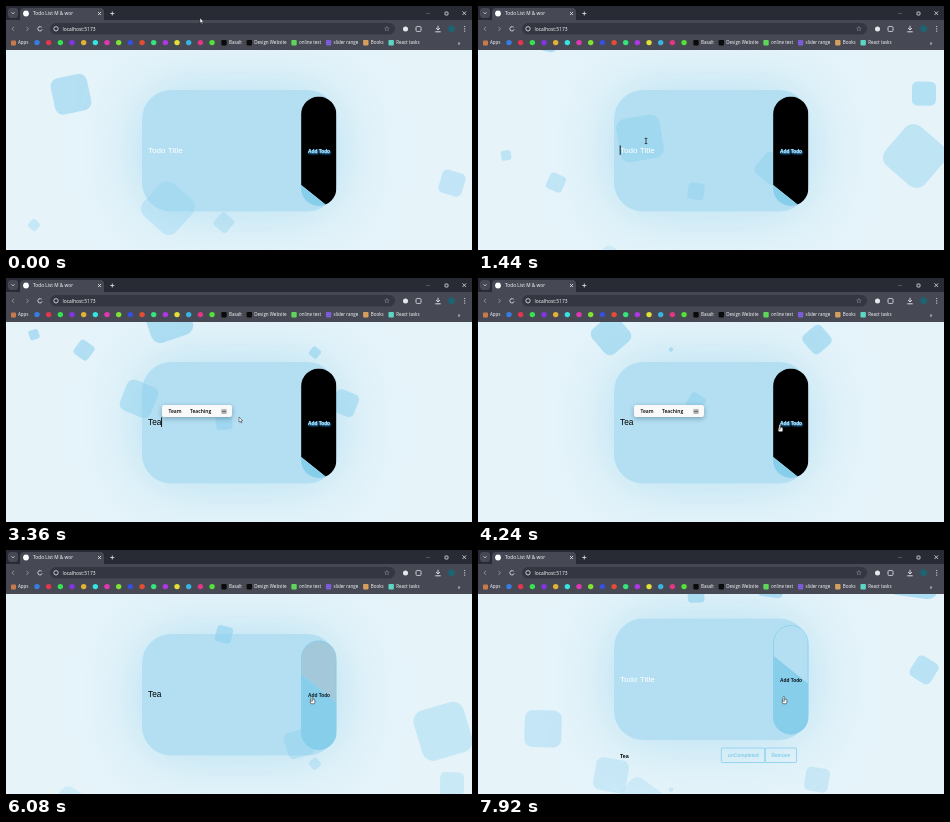
Write an HTML page with a canvas that moves like this. It is 466 by 244 pixels and loops after 8000 ms.

```html
<!DOCTYPE html>
<html lang="en">
<head>
<meta charset="utf-8">
<title>Todo list</title>
<style>
html, body { margin: 0; width: 100%; height: 100%; overflow: hidden; background: #e6f4fa; }
canvas { display: block; width: 466px; height: 244px; }
</style>
</head>
<body>
<canvas id="stage" width="466" height="244"></canvas>
<script>
const W = 466, H = 244, LOOP = 8000, STEP = 80;
const c = document.getElementById('stage').getContext('2d');
const SKY = '#87ceeb', INK = '#0a1218', PALE = '#e6e8ec', BAR = '#464954';
const SANS = '"Liberation Sans", Arial, sans-serif';
const UI = '"Open Sans", "Noto Sans", sans-serif';

// Pointer stops: arrival time, x, y
const STOPS = [
  [0, 194, 12], [1.1, 168, 135], [2.5, 167, 138], [3.3, 233, 139],
  [4.25, 302, 149], [5.2, 273, 148], [5.75, 306, 149]
];
const GLIDE = 0.55, FIRST_KEY = 1.8, KEY_GAP = 0.22, FOCUS = 1.36, ADDED = 6.2;

const clamp = v => Math.max(0, Math.min(1, v));
const ease = v => { v = clamp(v); return v * v * (3 - 2 * v); };

function box(x, y, w, h, r, fill, stroke, lw = 0.8) {
  c.beginPath();
  c.roundRect(x, y, w, h, r);
  if (fill) { c.fillStyle = fill; c.fill(); }
  if (stroke) { c.strokeStyle = stroke; c.lineWidth = lw; c.stroke(); }
}

function dot(x, y, r, fill) {
  box(x - r, y - r, r * 2, r * 2, r, fill);
}

function line(color, lw, ...p) {
  c.beginPath();
  for (let i = 0; i < p.length; i += 2) c.lineTo(p[i], p[i + 1]);
  c.strokeStyle = color;
  c.lineWidth = lw;
  c.stroke();
}

function text(s, x, y, size, color, font = SANS, weight = '', align = 'left') {
  c.font = `${weight} ${size}px ${font}`;
  c.textAlign = align;
  c.fillStyle = color;
  c.fillText(s, x, y);
  return c.measureText(s).width;
}

// A square rises and turns once every `secs`; `lead` is the time already spent.
function square(t, secs, lead, x, size) {
  const p = ((t + lead) / secs) % 1;
  c.save();
  c.translate(x, 296 - size / 2 - 435 * p);
  c.rotate(800 * p * Math.PI / 180);
  box(-size / 2, -size / 2, size, size, size * 0.22, `rgba(135,206,238,${0.22 + 0.66 * p})`);
  c.restore();
}

function squares(t) {
  const rise = (secs, lead, ...list) => list.forEach(([x, size]) => square(t, secs, lead, x, size));
  rise(4, 2.63, [309, 10]);
  rise(5, 4.94, [437, 52], [293, 27]);
  rise(6, 4.83, [133, 33], [339, 24], [193, 4]);
  rise(7, 1.72, [446, 24]);
  rise(8, 0.6, [78, 17]);
  rise(9, 1.49, [162, 44], [28, 10]);
  rise(10, 4.35, [65, 37]);
  rise(20, 3.27, [218, 16.5]);
}

function card(top) {
  c.save();
  c.beginPath();
  c.rect(0, 0, W, H);
  c.roundRect(136, top, 194.5, 121.5, 29);
  c.clip('evenodd');
  c.shadowColor = 'rgba(135,206,235,.55)';
  c.shadowBlur = 60;
  c.shadowOffsetX = 1000;
  box(-864, top, 194.5, 121.5, 29, '#000');
  c.restore();
  box(136, top, 194.5, 121.5, 29, 'rgba(135,206,235,.52)');
}

function addButton(top, hover) {
  const x = 295.1, y = top - 0.4, w = 35.3, h = 109.3, slope = 0.8;
  const cut = top + 88 - 58 * hover;
  const part = (edge, fill) => {
    c.beginPath();
    c.moveTo(x, cut);
    c.lineTo(x + w, cut + w * slope);
    c.lineTo(x + w, edge);
    c.lineTo(x, edge);
    c.fillStyle = fill;
    c.fill();
  };
  c.save();
  c.beginPath();
  c.roundRect(x, y, w, h, w / 2);
  c.clip();
  part(y, `rgba(0,0,0,${1 - hover * hover})`);
  part(y + h + w, SKY);
  c.restore();
  c.globalAlpha = hover;
  box(x + 0.4, top, w - 0.8, h - 0.8, w / 2, null, SKY);
  c.globalAlpha = 1;

  const label = color => text('Add Todo', 313, top + 56.3, 4.8, color, SANS, 'bold', 'center');
  label(INK);
  c.save();
  c.globalAlpha = 1 - hover;
  c.shadowColor = '#3f9fe0';
  c.shadowBlur = 2;
  c.shadowOffsetX = c.shadowOffsetY = 0.5;
  label('#a9dcf7');
  label('#a9dcf7');
  c.restore();
}

function field(t, top) {
  const base = top + 63.4;
  const typed = Math.floor((t - FIRST_KEY) / KEY_GAP) + 1;
  const n = t < ADDED ? Math.max(0, Math.min(3, typed)) : 0;
  const width = n ? text('Tea'.slice(0, n), 142, base, 8.3, '#000') : 0;
  if (!n) text('Todo Title', 142, base, 8.1, '#fff');
  if (t > FOCUS && t < 6) {
    const since = t - (n ? FIRST_KEY + (n - 1) * KEY_GAP : FOCUS);
    const x = 142.2 + width;
    if (since % 1.06 < 0.53) line('#000', 0.9, x, base - 8, x, base + 1.5);
  }
}

function hints() {
  c.save();
  c.shadowColor = 'rgba(0,40,70,.35)';
  c.shadowBlur = 5;
  c.shadowOffsetY = 1.5;
  box(156, 127, 70, 12, 2, '#f9f9f9');
  c.restore();
  text('Team', 162.5, 135, 5, '#000', UI, 600);
  text('Teaching', 184, 135, 5, '#000', UI, 600);
  for (let y = 132; y < 136; y += 1.5) line('#333', 0.7, 215.5, y, 220.5, y);
}

function task() {
  text('Tea', 142, 207.7, 5.3, '#000', SANS, 'bold');
  box(243.3, 198, 43.7, 14.5, 1, null, SKY);
  box(287, 198, 31.5, 14.5, 1, null, SKY);
  text('unCompleted', 265.3, 207, 4.85, SKY, SANS, 'bold', 'center');
  text('Remove', 302.8, 207, 4.85, SKY, SANS, 'bold', 'center');
}

function cross(x, y, r) {
  line(PALE, 0.8, x - r, y - r, x + r, y + r);
  line(PALE, 0.8, x + r, y - r, x - r, y + r);
}

function tabs() {
  c.fillStyle = '#282b34';
  c.fillRect(0, 0, W, 15);
  box(2, 2, 10, 10, 3, BAR);
  line(PALE, 0.8, 5.5, 6.3, 7, 7.8, 8.5, 6.3);
  box(14, 2, 84, 16, 4, BAR);
  c.fillStyle = BAR;
  c.fillRect(0, 14, W, 30);
  dot(20, 7.5, 2.9, '#fff');
  text('Todo List M & wor', 27, 9.2, 4.8, '#fff', UI);
  cross(93.5, 7.5, 1.5);
  line(PALE, 0.8, 104.3, 7.5, 108.3, 7.5);
  line(PALE, 0.8, 106.3, 5.5, 106.3, 9.5);
  line('#60636b', 0.7, 420, 7.5, 424, 7.5);
  box(439, 6, 3, 3, 0.5, null, PALE);
  cross(458.3, 7.2, 1.8);
}

function toolbar() {
  const y = 22.8;
  line('#a5a8b0', 0.8, 8, y - 2, 6, y, 8, y + 2);
  line('#a5a8b0', 0.8, 20.5, y - 2, 22.5, y, 20.5, y + 2);
  c.beginPath();
  c.arc(34, y, 2.2, 0.3, 5.6);
  c.strokeStyle = PALE;
  c.stroke();
  box(44, 17, 345, 11.5, 5.7, '#343741');
  box(47.8, y - 2.2, 4.4, 4.4, 2.2, null, PALE);
  text('localhost:5173', 56.5, 24.6, 4.9, '#fff', UI);
  text('☆', 381, 25.3, 7, PALE, '"DejaVu Sans", sans-serif', '', 'center');
  dot(399.5, 23, 2.5, PALE);
  box(410, 20.5, 5, 5, 1.2, null, PALE);
  line(PALE, 0.9, 432, 19.8, 432, 23.8);
  line(PALE, 0.9, 430, 22, 432, 24, 434, 22);
  line(PALE, 0.9, 429.3, 25.8, 434.7, 25.8);
  dot(445.5, y, 3.5, '#1f6373');
  for (let i = -1; i < 2; i++) dot(458.7, y + i * 2.3, 0.6, PALE);
}

function bookmarks() {
  const y = 38.3;
  box(5, 34.5, 5, 5, 1, '#c87a4a');
  text('Apps', 12, y, 4.5, '#fff', UI);
  for (let i = 0; i < 16; i++) dot(31 + i * 11.67, 36.6, 2.7, `hsl(${215 + i * 137} 75% 55%)`);
  let x = 218;
  ['Basalt', 'Design Website', 'online test', 'slider range', 'Books', 'React tasks'].forEach((label, i) => {
    box(x - 2.7, 34, 5.4, 5.4, 0.8, i < 2 ? '#0b0b0b' : `hsl(${205 + i * 137} 60% 60%)`);
    x += text(label, x + 5, y, 4.5, '#fff', UI) + 12.5;
  });
  text('»', 453, 38.6, 6, '#fff', UI, '', 'center');
}

function pointer(t) {
  let [, x, y] = STOPS[0];
  for (const [end, px, py] of STOPS) {
    const k = ease(1 + (t - end) / GLIDE);
    x += (px - x) * k;
    y += (py - y) * k;
  }
  c.save();
  c.translate(x, y);
  if (x > 295 && y > 90) {
    box(-1.7, 0.2, 4.6, 4.6, 1.5, '#fff', '#222', 0.6);
    box(-0.9, -2.5, 1.5, 5, 0.7, '#fff', '#222', 0.5);
  } else if (y > 90 && (t < 2.3 || t > 3.7)) {
    line('#222', 0.8, 0, -2.6, 0, 2.6);
    for (const end of [-2.6, 2.6]) line('#222', 0.8, -1.3, end, 1.3, end);
  } else {
    const arrow = new Path2D('M0 0V5.2L1.2 4.1 2 6 2.9 5.6 2.1 3.8H3.7Z');
    c.fillStyle = '#fff';
    c.fill(arrow);
    c.strokeStyle = '#222';
    c.lineWidth = 0.5;
    c.stroke(arrow);
  }
  c.restore();
}

function draw(t) {
  const hover = ease((t - 4.25) / 0.5) - ease((t - 4.8) / 0.48) + ease((t - 5.65) / 0.5);
  const top = t < ADDED ? 84 : 68.5;
  c.fillStyle = '#e6f4fa';
  c.fillRect(0, 0, W, H);
  squares(t);
  card(top);
  addButton(top + 7, clamp(hover));
  field(t, top);
  if (t >= ADDED) task();
  if (t >= 2.32 && t < 6) hints();
  tabs();
  toolbar();
  bookmarks();
  pointer(t);
}

function tick() {
  const ms = performance.now() % LOOP;
  draw(Math.floor(ms / STEP) * STEP / 1000);
  requestAnimationFrame(tick);
}
tick();
</script>
</body>
</html>
```
